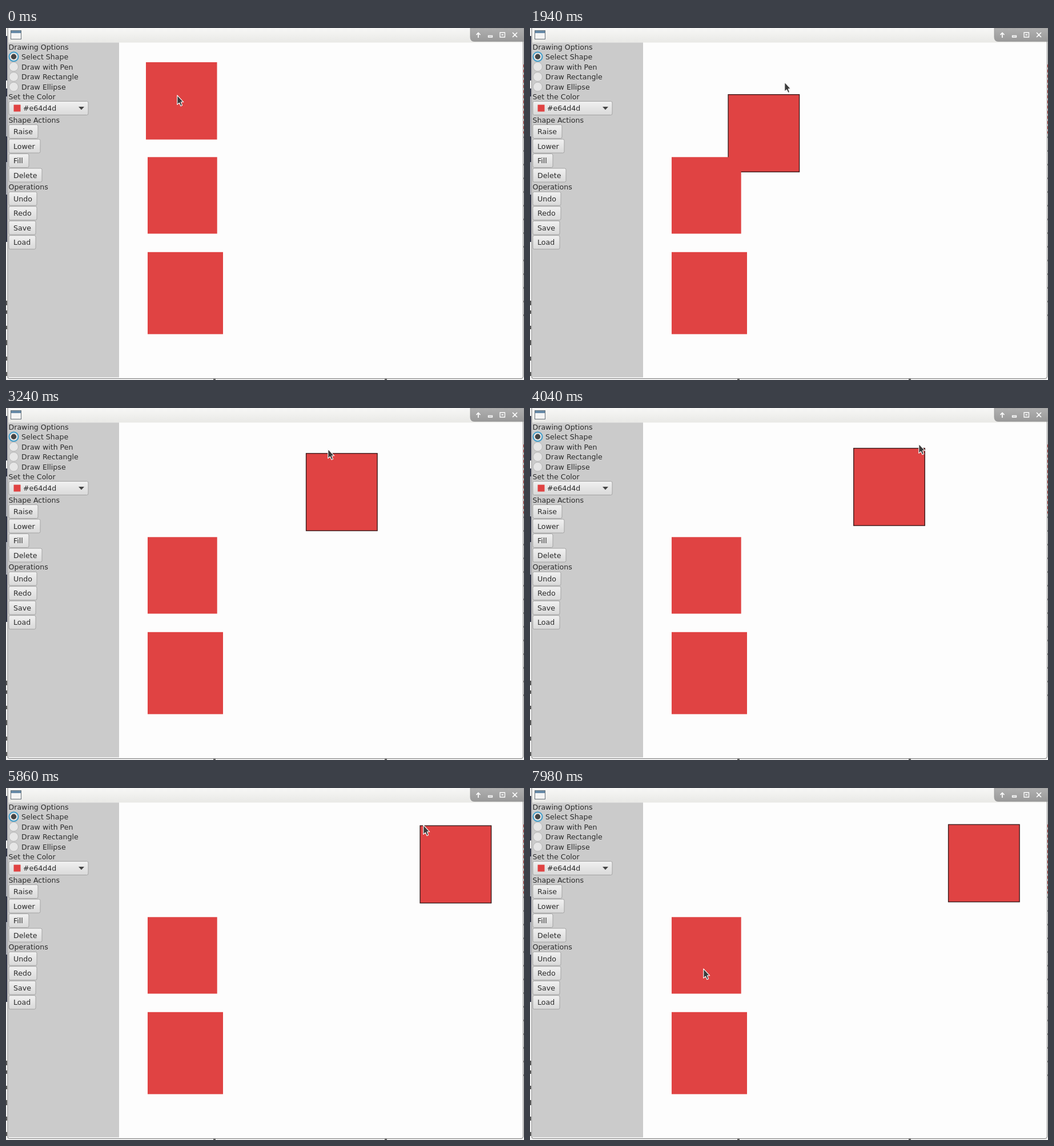
An HTML page for the animation above (8000 ms loop, 907x617 px).

```html
<!DOCTYPE html>
<html lang="en">
<head>
<meta charset="utf-8">
<title>Drawing program</title>
<style>
  html, body { margin: 0; width: 100%; height: 100%; overflow: hidden; background: #fdfdfd; }
  svg { display: block; width: 907px; height: 617px; }
  text { font: 12.6px "DejaVu Sans", sans-serif; fill: #2b2b2b; }
  .button { fill: url(#face); stroke: #a3a3a3; }
  .shape { fill: #e04343; }
</style>
</head>
<body>
<svg viewBox="0 0 907 617">
  <defs>
    <linearGradient id="face" x2="0" y2="1">
      <stop stop-color="#f1f1f1"/><stop offset="1" stop-color="#d9d9d9"/>
    </linearGradient>
    <linearGradient id="title" x2="0" y2="1">
      <stop stop-color="#f7f7f6"/><stop offset="1" stop-color="#e9e9e6"/>
    </linearGradient>
    <linearGradient id="tab" x2="0" y2="1">
      <stop stop-color="#b0b0b0"/><stop offset="1" stop-color="#999"/>
    </linearGradient>
  </defs>

  <!-- Slivers of the desktop around the window -->
  <rect width="907" height="617" fill="#f3f3f3"/>
  <path d="M1 14V92M1 106V120M1 190V235M1 292V375" stroke="#303447" stroke-width="2"/>
  <path d="M1 120V190M1 235V292" stroke="#a9abb5" stroke-width="2"/>
  <path d="M1 478V486M1 495V501M1 522V528M1 547V556M1 576V583M1 603V610" stroke="#555" stroke-width="2"/>
  <path d="M906.5 64V185" stroke="#c55" stroke-dasharray="5 4"/>
  <path d="M906.5 190V510" stroke="#999" stroke-dasharray="3 21"/>

  <!-- Window -->
  <rect x="3" width="902" height="614" fill="#fdfdfd"/>
  <rect x="3" width="902" height="25.5" fill="url(#title)"/>
  <rect x="4" y="25.5" width="194" height="587" fill="#cbcbcb"/>
  <path d="M3 0V612Q3 614.5 6 614.5H902Q905.5 614.5 905.5 611V0" fill="none" stroke="#777"/>
  <path d="M363 616H367M663 616H667" stroke="#666" stroke-width="2"/>
  <rect x="8.5" y="4.5" width="18" height="15" fill="#f4f4f4" stroke="#667078"/>
  <rect x="9" y="5" width="17" height="4" fill="#668aa8"/>
  <path d="M813 0H907V23.5H820Q813 23.5 813 16Z" fill="url(#tab)" stroke="#8e8e8e" stroke-width=".7"/>
  <g fill="none" stroke="#fff" stroke-width="1.7">
    <path d="M827 17V9M823.5 12L827 8.5L830.5 12M887 8L895 16M895 8L887 16"/>
    <path d="M844.5 13.5H851.5V16H844.5ZM865 8H873.5V16H865Z" stroke-width="1.3"/>
    <path d="M867.5 12H871"/>
  </g>

  <g id="panel">
    <rect class="button" x="5" y="128.5" width="139" height="24" rx="2.5"/>
    <rect x="13.5" y="134.5" width="12" height="12" fill="#e04343"/>
    <text x="30" y="145">#e64d4d</text>
    <path d="M127 138H137L132 143.5Z" fill="#444"/>
  </g>

  <!-- Canvas -->
  <rect id="moving" class="shape" width="124.5" height="135.5"/>
  <rect class="shape" x="248" y="226.3" width="121.7" height="134.2"/>
  <rect class="shape" x="248" y="392.8" width="132" height="143.8"/>
  <path id="cursor" d="M0 0V16.5L3.6 13.4L6.2 19L8.8 17.8L6.6 12H11Z"
        fill="#3b3b3b" stroke="#fff" stroke-width="1.1" stroke-linejoin="round"/>
</svg>
<script>
const LOOP = 8000, LAG = 740;
const SELECT_AT = 700, DRAG_AT = 900, RELEASE_AT = 6300;
const panel = document.getElementById('panel');
const moving = document.getElementById('moving');
const cursor = document.getElementById('cursor');

function add(tag, attributes, content = '') {
  const node = document.createElementNS('http://www.w3.org/2000/svg', tag);
  for (const name in attributes) node.setAttribute(name, attributes[name]);
  node.textContent = content;
  panel.append(node);
}

const label = (content, x, y) => add('text', { x, y }, content);

function button(content, y, width) {
  add('rect', { class: 'button', x: 5, y: y + .5, width, height: 24, rx: 2.5 });
  label(content, 13, y + 17);
}

function radio(content, y, checked) {
  add('circle', { cx: 13.5, cy: y, r: 8, fill: '#e6e6e6',
    stroke: checked ? '#3c9bc9' : '#b5b5b5', 'stroke-width': checked ? 2 : 1 });
  if (checked) add('circle', { cx: 13.5, cy: y, r: 4.7, fill: '#444' });
  label(content, 27, y + 4.7);
}

label('Drawing Options', 4.5, 38);
['Select Shape', 'Draw with Pen', 'Draw Rectangle', 'Draw Ellipse']
  .forEach((name, i) => radio(name, 50.3 + 17.6 * i, i === 0));
label('Set the Color', 4.5, 124.5);
label('Shape Actions', 4.5, 165.5);
[['Raise', 51], ['Lower', 55], ['Fill', 35], ['Delete', 58]]
  .forEach(([name, width], i) => button(name, 169 + 25.5 * i, width));
label('Operations', 4.5, 283);
[['Undo', 49], ['Redo', 49], ['Save', 47], ['Load', 47]]
  .forEach(([name, width], i) => button(name, 286.7 + 25.5 * i, width));

// Pointer path: time, x, y
const path = [
  [0, 299, 117], [160, 299, 117], [540, 317, 117], [1280, 350, 116],
  [1760, 419.5, 98.5], [2500, 525, 79], [3300, 566, 70], [4040, 680, 61.5],
  [4140, 681, 62.5], [4880, 714, 63], [5120, 724.5, 65.5], [5860, 730, 64.5],
  [6000, 732, 63.5], [6600, 732, 63.5], [7500, 560, 165],
  [7940, 303, 316], [LOOP, 303, 316]
];

function pointerAt(time) {
  const i = path.findIndex(key => key[0] > time);
  const [t0, x0, y0] = path[i - 1], [t1, x1, y1] = path[i];
  const p = (time - t0) / (t1 - t0);
  return [x0 + (x1 - x0) * p, y0 + (y1 - y0) * p];
}

function withRests(time) {
  if (time < 820) return time;
  const phase = (time - 820) % 840;
  return time - Math.max(0, phase - 740);
}

function draw(now) {
  const time = withRests(now % LOOP);
  const [px, py] = pointerAt(time);
  cursor.setAttribute('transform', `translate(${Math.round(px) + .8} ${Math.round(py) + .8})`);

  // The dragged corner follows the pointer late.
  const dragged = time >= DRAG_AT;
  const [x, y] = dragged ? pointerAt(Math.min(time - LAG, RELEASE_AT)) : [245, 60];
  const inset = dragged ? .6 : 0;
  moving.setAttribute('x', x + inset);
  moving.setAttribute('y', y + inset);
  moving.setAttribute('stroke', time >= SELECT_AT ? '#3a1c1c' : 'none');
  moving.setAttribute('stroke-width', 1.4);
}

const start = performance.now();
function tick() {
  draw(performance.now() - start);
  requestAnimationFrame(tick);
}
tick();
</script>
</body>
</html>
```
